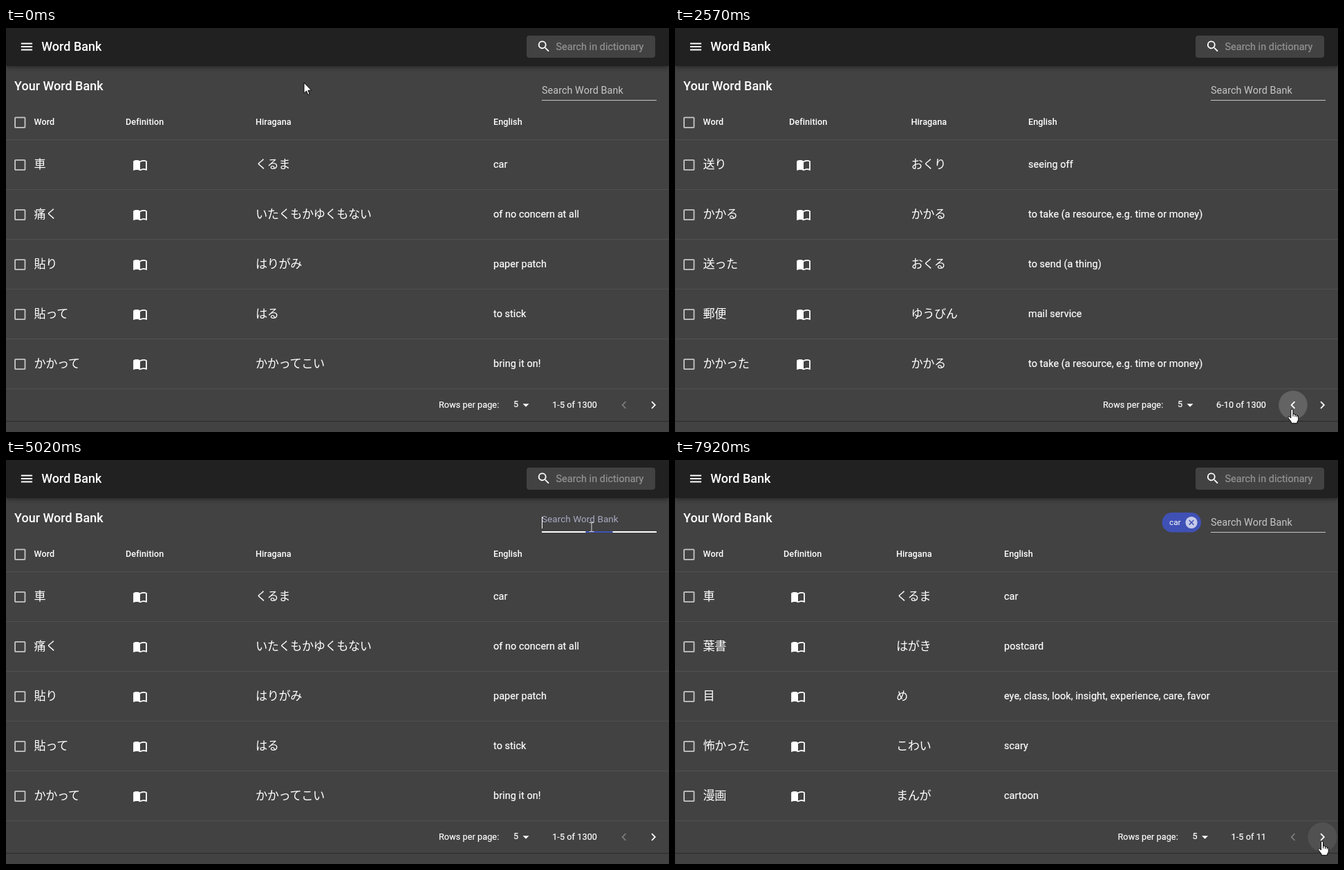
Animation of 959x584 px, one loop 7.99 s. Source, as an HTML page:

```html
<!DOCTYPE html>
<html lang="ja">
<head>
<meta charset="utf-8">
<title>Word Bank</title>
<style>
  html, body { margin: 0; width: 100%; height: 100%; overflow: hidden; background: #424242; }
  svg { display: block; }
  text { font-family: Roboto, sans-serif; font-size: 14.4px; letter-spacing: .05px; fill: #fff; white-space: pre; }
  .title { font-size: 18px; font-weight: 500; letter-spacing: 0; }
  .head { font-size: 12.6px; font-weight: 500; letter-spacing: .08px; }
  .small { font-size: 12.6px; letter-spacing: .1px; }
  .cell { letter-spacing: .07px; }
  .cell, .small { stroke: #fff; stroke-width: .2px; }
  .jp { font-family: "Noto Sans CJK JP", "Noto Sans CJK", sans-serif; font-size: 17.2px; letter-spacing: -.43px; }
  .hint { fill: #949494; stroke: #949494; stroke-width: .2px; }
  .chip { font-size: 11.7px; }
  .bar { filter: drop-shadow(0 2px 3px rgba(0, 0, 0, .4)); }
  .menu { filter: drop-shadow(0 3px 5px rgba(0, 0, 0, .4)); }
  .cursor { fill: #fff; stroke: #000; stroke-width: 1; stroke-linejoin: round; }
</style>
</head>
<body>
<svg id="stage" width="959" height="584" viewBox="0 0 959 584">
  <defs>
    <path id="box" d="M19 5v14H5V5h14m0-2H5c-1.1 0-2 .9-2 2v14c0 1.1.9 2 2 2h14c1.1 0 2-.9 2-2V5c0-1.1-.9-2-2-2z"/>
    <path id="book" d="M21 5c-1.11-.35-2.33-.5-3.5-.5-1.95 0-4.05.4-5.5 1.5-1.45-1.1-3.55-1.5-5.5-1.5S2.45 4.9 1 6v14.65c0 .25.25.5.5.5.1 0 .15-.05.25-.05C3.1 20.45 5.05 20 6.5 20c1.95 0 4.05.4 5.5 1.5 1.35-.85 3.8-1.5 5.5-1.5 1.65 0 3.35.3 4.75 1.05.1.05.15.05.25.05.25 0 .5-.25.5-.5V6c-.6-.45-1.25-.75-2-1zm0 13.5c-1.1-.35-2.3-.5-3.5-.5-1.7 0-4.15.65-5.5 1.5V8c1.35-.85 3.8-1.5 5.5-1.5 1.2 0 2.4.15 3.5.5z"/>
    <path id="lens" d="M15.5 14h-.8l-.3-.3A6.5 6.5 0 1 0 13.7 14.4l.3.3v.8l5 5 1.5-1.5zm-6 0a4.5 4.5 0 1 1 0-9 4.5 4.5 0 0 1 0 9z"/>
    <path id="bars" d="M3 18h18v-2H3zm0-5h18v-2H3zm0-7v2h18V6z"/>
    <path id="left" d="M15.4 16.6L10.8 12l4.6-4.6L14 6l-6 6 6 6z"/>
    <path id="right" d="M8.6 16.6L13.2 12 8.6 7.4 10 6l6 6-6 6z"/>
    <path id="down" d="M7 10l5 5 5-5z"/>
  </defs>

  <rect width="959" height="584" fill="#424242"/>
  <rect y="568" width="959" height="1" fill="#2b2b2b"/>
  <g id="lines" fill="#515151"></g>

  <g class="bar"><rect y="-10" width="959" height="65" fill="#212121"/></g>
  <use href="#bars" fill="#fff" transform="translate(19.2 16.2) scale(.9)"/>
  <text class="title" x="51.3" y="33">Word Bank</text>
  <rect x="753" y="11" width="186" height="32" rx="4" fill="#424242"/>
  <use href="#lens" fill="#fff" transform="translate(767.2 15.8) scale(.9)"/>
  <text class="hint" x="795.5" y="32">Search in dictionary</text>

  <text class="title" x="12" y="90">Your Word Bank</text>
  <text class="head" x="40.5" y="140">Word</text>
  <g id="checks" fill="#c6c6c6"></g>

  <g id="hovers" fill="#fff">
    <circle id="nextHover" cx="936.5" cy="545" r="21.2"/>
    <circle id="nextRipple" cx="936.5" cy="545" r="21.2"/>
    <circle id="prevHover" cx="894" cy="545" r="21.2"/>
    <circle id="prevRipple" cx="894" cy="545" r="21.2"/>
  </g>
  <use id="prev" href="#left" fill="#fff" transform="translate(883.2 534.2) scale(.9)"/>
  <use href="#right" fill="#fff" transform="translate(925.7 534.2) scale(.9)"/>
  <g id="pages"></g>

  <text id="label">Search Word Bank</text>
  <text id="typed" x="775" y="95"></text>
  <rect id="caret" y="82" width="1" height="17" fill="#fff"/>
  <rect x="775" y="104" width="166" height="1" fill="#c6c6c6"/>
  <rect id="lineHover" x="775" y="103" width="166" height="2" fill="#fff"/>
  <rect id="lineFocus" y="103" height="2" fill="#3f51b5"/>

  <g id="chip">
    <rect x="704.5" y="76" width="56.5" height="28.5" rx="14.25" fill="#3f51b5"/>
    <text class="chip" x="715" y="94">car</text>
    <circle cx="747" cy="90.3" r="8.6" fill="#c5cae9"/>
    <path d="M743.7 87l6.6 6.6m0-6.6l-6.6 6.6" stroke="#3f51b5" stroke-width="1.5"/>
  </g>

  <g id="menu" class="menu">
    <rect x="720" y="467" width="45" height="104" rx="3" fill="#424242"/>
    <rect x="720" y="468" width="45" height="32" fill="#606060"/>
    <rect id="itemHover" x="720" y="532" width="45" height="32" fill="#515151"/>
    <text class="cell" x="734.5" y="488">5</text>
    <text class="cell" x="734.5" y="520">10</text>
    <text class="cell" x="734.5" y="552">25</text>
  </g>

  <g id="cursor" class="cursor">
    <path id="arrow" d="M0 0V15.4L3.6 12 5.9 17.5 8.2 16.5 5.9 11.2H10.8Z"/>
    <g id="hand">
      <path d="M-1.6 1.8Q-1.6 0 0 0T1.6 1.8V7Q4.2 6.2 4.6 8Q6.8 7.4 7.2 9.2Q9.3 9 9.3 11V14.5Q9.3 16.5 7.6 18.2V20.3H-1V18.6L-5.5 12.6Q-6 10.6-4.4 10.6Q-3 10.8-1.6 12.8Z"/>
      <path d="M1.6 7V10.5M4.6 8V11M7.2 9.2V11.5" fill="none"/>
    </g>
    <path id="beam" d="M-3.5-6.5H-1L0-6 1-6.5H3.5M0-6V6M-3.5 6.5H-1L0 6 1 6.5H3.5" fill="none" stroke="#d8d8d8"/>
  </g>
</svg>
<script>
const LOOP = 7990;
const $ = id => document.getElementById(id);
const clamp = v => Math.min(1, Math.max(0, v));
const smooth = v => v * v * (3 - 2 * v);
const easeOut = v => 1 - (1 - v) ** 2;
const mix = (a, b, k) => a + (b - a) * k;
const ramp = (t, start, length) => clamp((t - start) / length);
const during = (t, a, b) => t >= a && t < b;
const fade = (t, a, b, length = 150) => ramp(t, a, length) - ramp(t, b, length);
const show = (id, on) => $(id).style.display = on ? '' : 'none';
const rowY = i => 72 * i;

// x: left edges of the definition, hiragana and English columns
const pages = [
  { x: [173, 361, 705], foot: [626, 734, 752], range: '1-5 of 1300', rows: [
    ['車', 'くるま', 'car'],
    ['痛く', 'いたくもかゆくもない', 'of no concern at all'],
    ['貼り', 'はりがみ', 'paper patch'],
    ['貼って', 'はる', 'to stick'],
    ['かかって', 'かかってこい', 'bring it on!']] },
  { x: [165, 341.5, 511], foot: [619, 727, 745], range: '6-10 of 1300', rows: [
    ['送り', 'おくり', 'seeing off'],
    ['かかる', 'かかる', 'to take (a resource, e.g. time or money)'],
    ['送った', 'おくる', 'to send (a thing)'],
    ['郵便', 'ゆうびん', 'mail service'],
    ['かかった', 'かかる', 'to take (a resource, e.g. time or money)']] },
  { x: [157, 320, 476], foot: [640.5, 748.5, 766.5], range: '1-5 of 11', rows: [
    ['車', 'くるま', 'car'],
    ['葉書', 'はがき', 'postcard'],
    ['目', 'め', 'eye, class, look, insight, experience, care, favor'],
    ['怖かった', 'こわい', 'scary'],
    ['漫画', 'まんが', 'cartoon']] }
];

const text = (kind, x, y, s, extra = '') => `<text class="${kind}" x="${x}" y="${y}" ${extra}>${s}</text>`;
const icon = (name, x, y) => `<use href="#${name}" transform="translate(${x} ${y}) scale(.9)"/>`;

function pageMarkup({ x: [def, kana, eng], foot, range, rows }, n) {
  const heads = text('head', def, 140, 'Definition') + text('head', kana, 140, 'Hiragana') + text('head', eng, 140, 'English');
  const body = rows.map(([word, reading, meaning], i) =>
    text('jp', 40.5, 203 + rowY(i), word) +
    icon('book', def + 10.2, 187 + rowY(i)) +
    text('jp', kana, 203 + rowY(i), reading) +
    text('cell', eng, 202 + rowY(i), meaning)).join('');
  const footer = text('small', foot[0], 549, 'Rows per page:') + text('small', foot[1], 548, '5') +
    icon('down', foot[2] - 10.8, 534.2) + text('small', 855, 549, range, 'text-anchor="end"');
  return `<g id="page${n}" fill="#fff">${heads}${body}${footer}</g>`;
}

$('pages').innerHTML = pages.map(pageMarkup).join('');
$('lines').innerHTML = [0, 1, 2, 3, 4, 5].map(i => `<rect y="${161 + rowY(i)}" width="959" height="1"/>`).join('');
$('checks').innerHTML = icon('box', 9.5, 125.8) + pages[0].rows.map((_, i) => icon('box', 9.5, 187.2 + rowY(i))).join('');

// [ms, x, y] of the pointer's hot spot
const path = [
  [430, 431, 79], [1220, 931, 553], [1390, 933.5, 553], [2050, 933.5, 553], [2400, 892.5, 551],
  [2870, 892, 551], [3130, 738, 543], [3400, 738, 543], [3660, 741, 545], [3760, 741, 545],
  [3990, 747, 561], [4130, 747, 561], [4420, 630, 87], [4500, 618, 82], [4620, 618, 82],
  [4880, 847, 97], [6770, 847, 97], [7190, 875, 498], [7330, 875, 498], [7740, 934, 560], [7920, 936, 551]
];

function pointAt(t) {
  const i = path.findIndex(p => p[0] > t);
  if (i < 0) return path[path.length - 1].slice(1);
  if (i === 0) return path[0].slice(1);
  const [a, b] = [path[i - 1], path[i]];
  const k = smooth(ramp(t, a[0], b[0] - a[0]));
  return [mix(a[1], b[1], k), mix(a[2], b[2], k)];
}

function drawCursor(t) {
  const [x, y] = pointAt(t);
  const hand = during(t, 1200, 2620) || during(t, 3080, 4190) || t >= 7660;
  const beam = during(t, 4815, 6860);
  show('hand', hand);
  show('beam', beam);
  show('arrow', !hand && !beam);
  $('cursor').setAttribute('transform', `translate(${x.toFixed(1)} ${y.toFixed(1)})`);
}

function drawRipple(id, t, start, end) {
  const grow = easeOut(ramp(t, start, 220));
  $(id).setAttribute('r', 20.5 * grow);
  $(id).setAttribute('opacity', .1 * ramp(t, start, 150) * (1 - ramp(t, end, 250)));
}

function drawPaging(t) {
  const page = t >= 6170 ? 2 : during(t, 1350, 2610) ? 1 : 0;
  pages.forEach((_, n) => show('page' + n, n === page));
  $('prev').setAttribute('opacity', page === 1 ? 1 : .3);
  $('nextHover').setAttribute('opacity', .08 * (fade(t, 1235, 2150) + ramp(t, 7740, 150)));
  $('prevHover').setAttribute('opacity', .08 * fade(t, 2260, 2610));
  drawRipple('nextRipple', t, 1380, 1750);
  drawRipple('prevRipple', t, 2350, 2610);
}

function drawMenu(t) {
  const open = easeOut(ramp(t, 3180, 220)), close = ramp(t, 4590, 200);
  const size = easeOut(ramp(t, 3180, 147)) * (1 - close);
  show('menu', during(t, 3180, 4790));
  show('itemHover', t < 4190);
  $('menu').setAttribute('opacity', open * (1 - close));
  $('menu').setAttribute('transform',
    `translate(742 484) scale(${mix(.75, 1, size)} ${mix(.5625, 1, size)}) translate(-742 -484)`);
}

function drawField(t) {
  const entered = t >= 6140;
  const focus = entered ? 0 : smooth(ramp(t, 4960, 190));
  const tint = (from, to) => Math.round(mix(from, to, focus));
  $('label').setAttribute('transform', `translate(775 ${mix(95, 72, focus)}) scale(${mix(1, .75, focus)})`);
  $('label').style.fill = `rgb(${tint(198, 63)},${tint(198, 81)},${tint(198, 181)})`;
  $('lineFocus').setAttribute('x', 858 - 83 * focus);
  $('lineFocus').setAttribute('width', 166 * focus);
  show('lineHover', during(t, 4815, 6860));

  const count = entered ? 0 : [5780, 5860, 5940].filter(at => t >= at).length;
  $('typed').textContent = 'car'.slice(0, count);
  $('caret').setAttribute('x', 775 + Math.round($('typed').getComputedTextLength()));
  show('caret', during(t, 4980, 5380) || during(t, 5780, 6140));
  show('chip', entered);
}

let start;
function frame(now) {
  start ??= now;
  const t = (now - start) % LOOP;
  drawPaging(t);
  drawMenu(t);
  drawField(t);
  drawCursor(t);
  requestAnimationFrame(frame);
}
requestAnimationFrame(frame);
</script>
</body>
</html>
```
